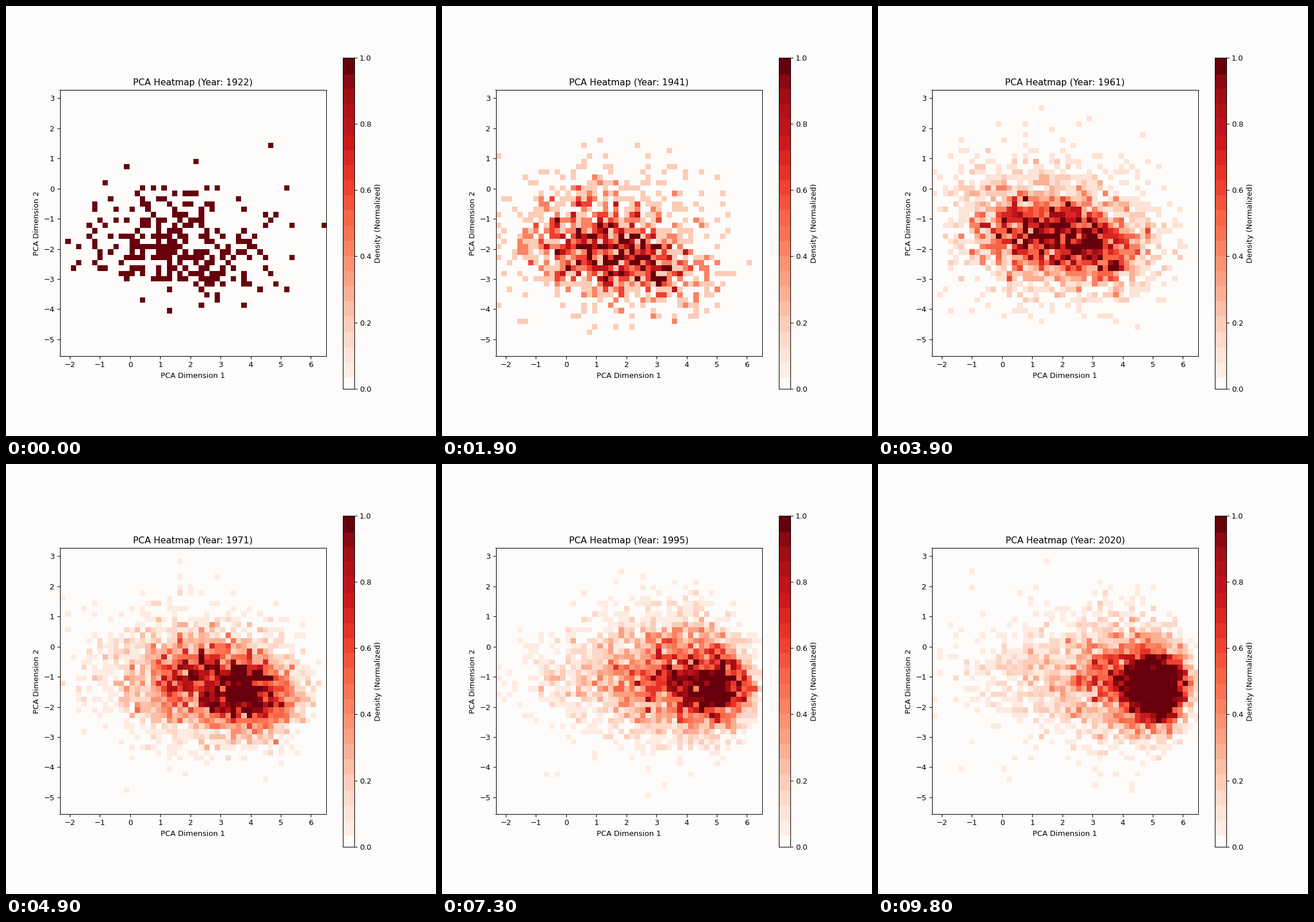
These frames come from a looping animation (748 px wide and 748 px high, 9.9 s). A matplotlib script:

```python
import numpy as np
import matplotlib.pyplot as plt
from matplotlib.animation import FuncAnimation
from matplotlib.colors import ListedColormap, to_rgba

INCHES, DPI = 8, 93.5
FIRST_YEAR, YEARS = 1922, 99
BINS = 50
LEFT, RIGHT, BOTTOM, TOP = -2.334, 6.511, -5.564, 3.272
PAPER = "#fefcfa"


def centers(low, high):
    edges = np.linspace(low, high, BINS + 1)
    return (edges[:-1] + edges[1:]) / 2


X, Y = np.meshgrid(centers(LEFT, RIGHT), centers(BOTTOM, TOP))


def ease(year, start, end):
    """Smooth step from 0 to 1 between two years."""
    u = np.clip((year - start) / (end - start), 0, 1)
    return u * u * (3 - 2 * u)


def blob(height, x, y, sx, sy, tilt=0):
    dx = X - x
    dy = Y - y - tilt * dx
    return height * np.exp(-0.5 * ((dx / sx) ** 2 + (dy / sy) ** 2))


def density(year):
    """Expected cell values: the cloud rises, slides right, then tightens."""
    rise = ease(year, 1941, 1980)
    slide = rise ** 4
    focus = ease(year, 1995, 2020)
    tilt = -0.2 * (1 - slide)

    core = blob(0.5 + 0.5 * rise + focus, 2.8 + 2.3 * slide,
                -2.45 + 1.05 * rise, 1.1 - 0.45 * slide, 0.72, tilt)
    middle = blob(0.55 - 0.15 * focus, 0.7 + 3.1 * slide,
                  -2 + rise, 1.15, 0.8 + 0.25 * slide, tilt)
    tail = blob(0.2 - 0.07 * focus, 1.4 + 0.5 * slide,
                -1.4 + 0.4 * rise, 1.6, 1.15 - 0.4 * slide)
    haze = blob(0.03, 1.2 + 2 * slide, -1, 2.2, 1.5)

    # The cloud ends in a rounded border on the right.
    border = X + 0.15 * (Y + 1.2) ** 2 - 6.35
    return (core + middle + tail + haze) / (1 + np.exp(border / 0.13))


def heatmap(year):
    full = round(min(15, 1 + 0.235 * (year - FIRST_YEAR)))
    counts = np.random.default_rng(year).poisson(density(year) * full)
    return np.clip(counts / full, 0, 1)


def banded_reds(low=0.035, high=0.95, bands=20, size=200):
    """Reds in flat bands, with paper below and the darkest red above."""
    reds = plt.get_cmap("Reds")
    width = (high - low) / bands
    steps = (np.arange(size) + 0.5) / size
    colors = reds(low + (np.floor((steps - low) / width) + 0.5) * width)
    colors[steps < low] = to_rgba(PAPER)
    colors[steps > high] = reds(1.0)
    return ListedColormap(colors)


plt.rcParams["font.family"] = "DejaVu Sans"
fig, ax = plt.subplots(figsize=(INCHES, INCHES), dpi=DPI, facecolor=PAPER)
ax.set_facecolor(PAPER)
image = ax.imshow(heatmap(FIRST_YEAR), extent=(LEFT, RIGHT, BOTTOM, TOP),
                  origin="lower", cmap=banded_reds(), vmin=0, vmax=1,
                  interpolation="nearest")
ax.set_xticks(range(-2, 7))
ax.set_yticks(range(-5, 4))
ax.set_xlabel("PCA Dimension 1")
ax.set_ylabel("PCA Dimension 2")
title = ax.set_title("")
bar = fig.colorbar(image, ax=ax, aspect=29.5, ticks=np.linspace(0, 1, 6))
bar.set_label("Density (Normalized)")


def update(frame):
    year = FIRST_YEAR + frame
    image.set_data(heatmap(year))
    title.set_text(f"PCA Heatmap (Year: {year})")
    return image, title


anim = FuncAnimation(fig, update, frames=YEARS, interval=100, repeat=True,
                     repeat_delay=0)
plt.show()
```
